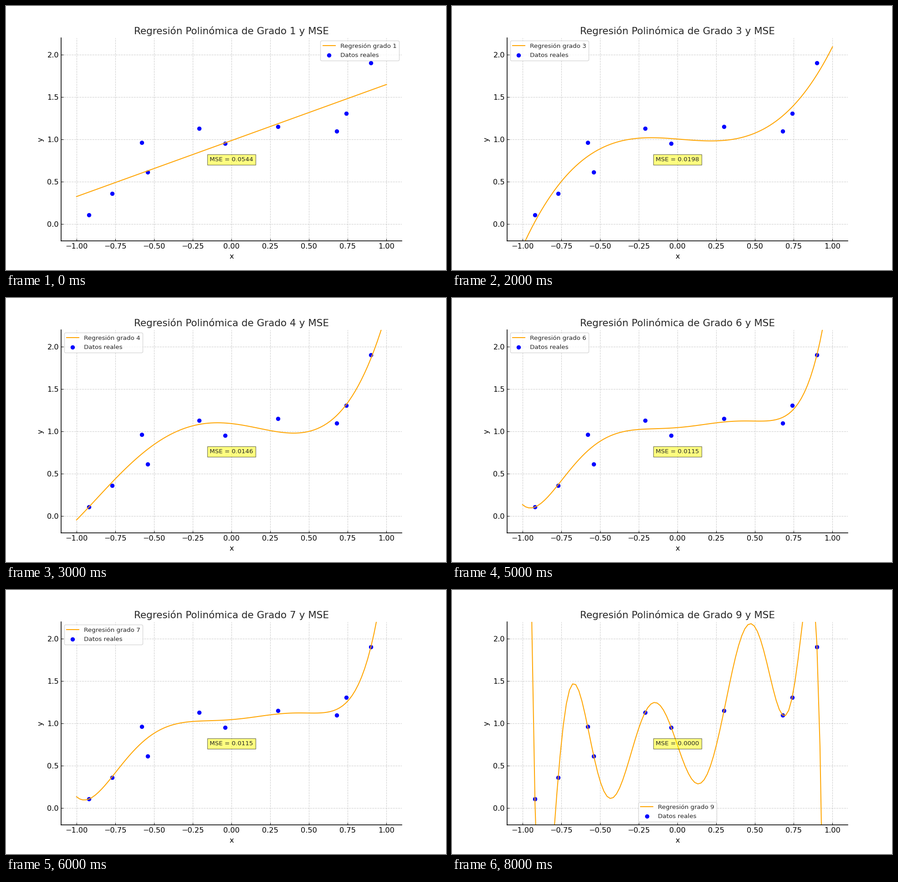
Animation, 966 px wide and 580 px high, one loop 9 s. Source, as a matplotlib script:

```python
import numpy as np
import matplotlib.pyplot as plt
from matplotlib.animation import FuncAnimation

plt.rcParams.update({
    "font.family": "DejaVu Sans",
    "font.size": 12,
    "text.color": ".15",
    "axes.titlesize": 16,
    "axes.labelpad": 5,
    "axes.linewidth": 1.2,
    "axes.spines.top": False,
    "axes.spines.right": False,
    "axes.axisbelow": True,
    "axes.grid": True,
    "grid.linestyle": "--",
    "grid.alpha": 0.6,
    "legend.fontsize": 10.1,
    "xtick.direction": "in",
    "ytick.direction": "in",
})

MAX_DEGREE = 9

# Rough samples, and the turning points of the curve that interpolates them
xs = np.array([-.92, -.77, -.58, -.54, -.21, -.04, .30, .68, .74, .90])
rough = [.107, .357, .962, .612, 1.127, .947, 1.147, 1.094, 1.308, 1.90]
turn_x = [-.677, -.434, -.151, .131, .475]
turn_y = [1.467, .114, 1.246, .287, 2.177]

# The samples lie on that curve, so the highest degree fits them exactly
shape = np.polyfit(np.r_[xs, turn_x], np.r_[rough, turn_y], MAX_DEGREE)
ys = np.polyval(shape, xs)
grid = np.linspace(-1, 1, 100)

fig, ax = plt.subplots(figsize=(10, 6.0042), dpi=96.6)
line, = ax.plot([], [], color="orange", lw=1.5)
ax.scatter(xs, ys, color="blue", label="Datos reales")
note = ax.text(.5, .4, "", transform=ax.transAxes, fontsize=10.1,
               ha="center", va="center", bbox=dict(facecolor="yellow", alpha=.5))
ax.set(xlim=(-1.1, 1.1), ylim=(-.2, 2.2), xlabel="x", ylabel="y")


def update(i):
    degree = i + 1
    fit = np.polyfit(xs, ys, degree)
    mse = np.mean((ys - np.polyval(fit, xs)) ** 2)
    line.set_data(grid, np.polyval(fit, grid))
    line.set_label(f"Regresión grado {degree}")
    note.set_text(f"MSE = {mse:.4f}")
    ax.set_title(f"Regresión Polinómica de Grado {degree} y MSE")
    ax.legend(loc="best")
    return line, note


anim = FuncAnimation(fig, update, frames=MAX_DEGREE, interval=1000,
                     repeat=True, repeat_delay=0, blit=False)
plt.show()
```
